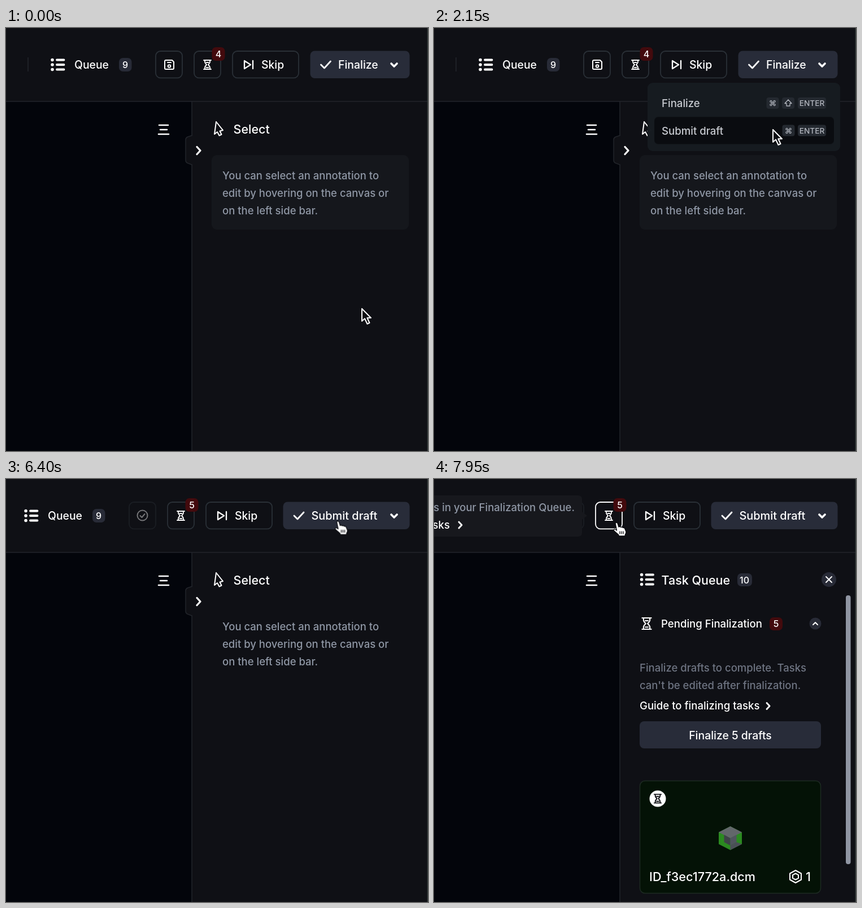
An HTML page that plays this animation: 747 by 749 pixels, repeating every 8 s.

```html
<!DOCTYPE html>
<html lang="en">
<head>
<meta charset="utf-8">
<title>Task toolbar</title>
<style>
html, body { margin: 0; width: 100%; height: 100%; overflow: hidden; background: #0f1015; }
svg { display: block; width: 747px; height: 749px; }
text { font: 500 19.4px Inter, "DejaVu Sans", sans-serif; fill: #fff; white-space: pre; }
.body { font-size: 18.5px; fill: #8f97a5; }
.faint { fill: #6e7482; }
.hint { font-size: 17.8px; }
.title { font-size: 21.5px; }
.item { font-size: 18.6px; fill: #c9ccd2; }
.label { font-size: 18.6px; }
.file { font-size: 21.6px; }
.num { font-size: 16px; text-anchor: middle; }
.key { font-size: 13.7px; fill: #b4b8c0; text-anchor: middle; }
.end { text-anchor: end; }
.mid { text-anchor: middle; }
.line { fill: none; stroke: #fff; stroke-width: 2; stroke-linejoin: round; stroke-linecap: round; }
.bold { stroke-width: 3.3; }
.box { fill: none; stroke: #2a3037; stroke-width: 1.8; }
.chip { fill: #282b37; }
.red { fill: #430a0d; }
.btn { fill: #282c39; }
.tip { fill: #17181d; }
.cap { fill: #252a31; }
</style>
</head>
<body>
<svg viewBox="0 0 747 749">
  <defs>
    <g id="list" class="line">
      <path d="M2 2h.1M2 10.5h.1M2 19h.1" style="stroke-width:5.4"/>
      <path d="M10 2H22.5M10 10.5H22.5M10 19H22.5" style="stroke-width:3.8"/>
    </g>
    <path id="glass" d="M-6.5-8H6.5M-6.5 8H6.5M-4.5-8V-5Q-4.5-3-1.3 0Q-4.5 3-4.5 5V8M4.5-8V-5Q4.5-3 1.3 0Q4.5 3 4.5 5V8M-2-4H2M-2 5H2"/>
    <path id="check" class="line" style="stroke-width:2.8" d="M0 7L6 13L17 1"/>
    <path id="right" class="line bold" d="M0 0L6 6.5L0 13"/>
    <path id="down" class="line" style="stroke-width:3.6" d="M682 63L687 68L692 63"/>
    <g id="enter">
      <rect class="cap" x="644" y="-10" width="50" height="20" rx="4"/>
      <text class="key" x="669" y="5">ENTER</text>
    </g>
    <g id="cmd">
      <rect class="cap" x="-11" y="-10" width="22" height="20" rx="4"/>
      <text class="key" y="5">⌘</text>
    </g>
  </defs>

  <rect width="747" height="749" fill="#0f1015"/>
  <rect y="130" width="329" height="619" fill="#03050b"/>
  <path d="M0 130H746M329 130V749" fill="none" stroke="#22252b" stroke-width="1.5"/>
  <path class="line" style="stroke-width:2.6" d="M271 172H287M273 180H285M270 188H288"/>

  <g id="select">
    <path d="M330 190L321 193Q318 194.5 318 198V234Q318 237.5 321 239L330 242.5" fill="#0f1015" stroke="#22252b" stroke-width="1.5"/>
    <use href="#right" x="338" y="210.5"/>
    <path class="line" d="M372 166L369 188L374 184L377.5 190.5L381.5 188.5L378.5 182.5L384 181Z"/>
    <text class="title" x="402.5" y="187">Select</text>
    <rect id="card" x="364" y="225" width="349" height="132" rx="9" fill="#15171c"/>
    <text class="body" x="383" y="267.6">You can select an annotation to</text>
    <text class="body" x="383" y="299">edit by hovering on the canvas or</text>
    <text class="body" x="383" y="330.4">on the left side bar.</text>
  </g>

  <g id="tasks">
    <rect x="330" y="131" width="415" height="618" fill="#0f1015"/>
    <use href="#list" x="365.5" y="167.5"/>
    <text class="title" x="402.5" y="186.5">Task Queue</text>
    <rect class="chip" x="537" y="167" width="26" height="23" rx="7"/>
    <text class="num" x="549.5" y="184.5">10</text>
    <circle class="chip" cx="699" cy="178" r="13"/>
    <path class="line" d="M694 173L704 183M704 173L694 183"/>
    <rect x="729" y="206" width="8.5" height="476" rx="4" fill="#9096a3"/>
    <use href="#glass" class="line" style="stroke-width:1.7" transform="translate(376.5 256) scale(1.25)"/>
    <text class="label" x="402" y="263">Pending Finalization</text>
    <rect class="red" x="594" y="245" width="23" height="23" rx="7"/>
    <text class="num" x="605.5" y="262">5</text>
    <circle class="chip" cx="675" cy="256" r="10.5"/>
    <path class="line" d="M671 258L675 254L679 258"/>
    <text class="body faint" x="364" y="340.5">Finalize drafts to complete. Tasks</text>
    <text class="body faint" x="364" y="372">can't be edited after finalization.</text>
    <text class="label" x="364" y="408">Guide to finalizing tasks</text>
    <use href="#right" transform="translate(589 396.5) scale(.85)"/>
    <rect class="btn" x="364" y="429" width="321" height="48" rx="8"/>
    <text class="mid" x="524.5" y="460.5">Finalize 5 drafts</text>
    <rect x="364.5" y="534.5" width="320" height="199" rx="9" fill="#041206" stroke="#1d2a22" stroke-width="1.5"/>
    <circle cx="396" cy="566" r="14.5" fill="#fff"/>
    <use href="#glass" class="line" style="stroke:#0f1015" transform="translate(396 566) scale(.95)"/>
    <g transform="translate(524.5 636)">
      <path d="M0-21L20.5-10.5V10.5L0 21L-20.5 10.5V-10.5Z" fill="#2b8a20"/>
      <path d="M0-21L20.5-10.5L0 0L-20.5-10.5Z" fill="#62676a"/>
      <path d="M-11-6L0 0V13L-11 7Z" fill="#3d4247"/>
      <path d="M0 0L11-6V7L0 13Z" fill="#50555e"/>
      <path d="M0 13L11 7L20.5 10.5L0 21Z" fill="#4a4f56"/>
    </g>
    <text class="file" x="381" y="712">ID_f3ec1772a.dcm</text>
    <path class="line" d="M640 693L650 698.5V709.5L640 715L630 709.5V698.5ZM640 698.5L645 701.2V706.8L640 709.5L635 706.8V701.2Z"/>
    <text class="file" x="658" y="712">1</text>
  </g>

  <g id="bar">
    <g id="queue">
      <path d="M39 52V77" stroke="#23262c" stroke-width="1.5"/>
      <use href="#list" x="80" y="54.5"/>
      <text x="121" y="72">Queue</text>
      <g id="nine">
        <rect class="chip" x="200" y="53" width="22.5" height="24" rx="7"/>
        <text class="num" x="211" y="71">9</text>
      </g>
      <g id="ten">
        <rect class="chip" x="199" y="53" width="27" height="24" rx="7"/>
        <text class="num" x="212.5" y="71">10</text>
      </g>
    </g>
    <g id="save">
      <rect class="box" x="265" y="41" width="47" height="47.3" rx="8.5"/>
      <path class="line" d="M281 59Q281 57 283 57H294L297 60V71Q297 73 295 73H283Q281 73 281 71ZM286 61H292"/>
      <circle class="line" cx="289" cy="67.5" r="2.3"/>
    </g>
    <g id="saved" opacity=".42">
      <rect class="box" x="265" y="41" width="47" height="47.3" rx="8.5"/>
      <circle class="line" cx="288.5" cy="64.5" r="9"/>
      <path class="line" d="M284.5 65L287.5 68L292.5 62"/>
    </g>
    <rect id="glassBox" class="box" x="333" y="41" width="47" height="47.3" rx="8.5"/>
    <use href="#glass" class="line" style="stroke-width:1.8" x="356.5" y="65"/>
    <rect class="red" x="364.5" y="34" width="23" height="24" rx="7"/>
    <text id="four" class="num" x="376" y="52">4</text>
    <text id="five" class="num" x="376" y="52">5</text>
    <g id="skip">
      <rect id="skipBox" class="box" x="401" y="41" width="117" height="47.3" rx="8.5"/>
      <path class="line" style="stroke-width:2.3" d="M422 58L433 65L422 72ZM437 58V72"/>
      <text x="452" y="72">Skip</text>
    </g>
  </g>

  <g id="finalize">
    <rect class="btn" x="538.5" y="40.5" width="176" height="48.5" rx="8"/>
    <use href="#check" x="557.5" y="58"/>
    <text x="588" y="72">Finalize</text>
    <use href="#down"/>
  </g>
  <g id="submit">
    <rect id="submitBox" class="btn" x="490.5" y="40.5" width="224" height="48.5" rx="8"/>
    <g id="submitText">
      <use href="#check" x="510" y="58"/>
      <text x="540.5" y="72" style="font-size:19.9px">Submit draft</text>
    </g>
    <use id="caret" href="#down"/>
    <path id="split" d="M491 49Q491 41 499 41H666V89H499Q491 89 491 81Z" fill="#000"/>
  </g>

  <g id="menu">
    <rect x="378" y="97" width="341" height="121" rx="9" fill="#171c21"/>
    <rect id="pick" x="390" y="109" width="318" height="48" rx="7" fill="#0b0d11"/>
    <text class="item" x="403" y="140">Finalize</text>
    <text class="item" x="403" y="188.5">Submit draft</text>
    <use href="#cmd" x="599.5" y="133"/>
    <rect class="cap" x="616" y="123" width="22" height="20" rx="4"/>
    <path class="line" style="stroke:#b4b8c0;stroke-width:1.3" d="M627 127L633 133.5H630V138H624V133.5H621Z"/>
    <use href="#enter" y="133"/>
    <use href="#cmd" x="627.5" y="181.5"/>
    <use href="#enter" y="181.5"/>
  </g>

  <text id="skipTip" class="body hint mid" x="412" y="134.5">You can skip this task and access it later</text>
  <g id="glassTip">
    <path class="tip" d="M-9 29H255Q262 29 262 36V58L271 65L262 72V95Q262 102 255 102H-9Z"/>
    <text class="body end" x="249" y="56.5">You have 5 tasks in your Finalization Queue.</text>
    <text class="label end" x="28" y="87.5">Guide to finalizing tasks</text>
    <use href="#right" transform="translate(44 76) scale(.85)"/>
  </g>

  <rect id="dim" width="747" height="749" fill="#000"/>
  <path d="M746.3 0V749" stroke="#3c4441" stroke-width="1.2"/>

  <g id="cursor">
    <path id="arrow" d="M0 0V22L5 17.5L9.5 27L13.5 25L9.3 16.3H16Z" fill="#0b0c10" stroke="#fff" stroke-width="2" stroke-linejoin="round"/>
    <g id="hand" stroke="#08090d" stroke-width="1.3" stroke-linejoin="round">
      <path d="M3 2.5Q5-.5 7 2.5L9 9Q11 7.5 12.500 9.300Q15 8.300 16.500 10.300Q19 9.500 20 12.500L22 17.500Q22 20.500 20.500 22L20 25H9.500L8.500 22.500Q4 19 .5 15.500Q-.5 12.500 2.500 13L5.500 15Z" fill="#fff"/>
      <path d="M11 16.5V21.5M14 16.5V21.5M17 16.5V21.5" fill="none"/>
    </g>
  </g>
</svg>
<script>
const LOOP = 8000;
const at = (x, y) => `translate(${x}px, ${y}px)`;

// Plays a table of [time, value] rows; hard rows hold until the next one.
function track(id, prop, rows, hard = false) {
  const full = [[0, rows[0][1]], ...rows, [LOOP, rows[rows.length - 1][1]]];
  const frames = full.map(([t, value]) => ({
    offset: t / LOOP, [prop]: value, easing: hard ? 'step-end' : 'linear'
  }));
  document.getElementById(id).animate(frames, { duration: LOOP, iterations: Infinity });
}
const fade = (id, ...rows) => track(id, 'opacity', rows);
const swap = (id, ...rows) => track(id, 'opacity', rows, true);

// Eased move along a quadratic curve, as rows.
function arc(t0, t1, [ax, ay], [cx, cy], [bx, by], steps = 12) {
  return Array.from({ length: steps + 1 }, (_, i) => {
    const k = i / steps, u = k * k * (3 - 2 * k), v = 1 - u;
    const mix = (a, c, b) => a * v * v + 2 * c * u * v + b * u * u;
    return [t0 + (t1 - t0) * k, at(mix(ax, cx, bx), mix(ay, cy, by))];
  });
}

track('cursor', 'transform', [
  ...arc(350, 1000, [630, 497], [580, 300], [689, 57.5]),
  ...arc(1450, 2000, [689, 57.5], [660, 150], [600, 180]),
  ...arc(2200, 2650, [600, 180], [612, 120], [599, 71]),
  [3000, at(599, 71)],
  [4700, at(593, 70.5)],
  [5500, at(589, 71)],
  [6349, at(589, 71)],
  [6350, at(582.5, 73.5)],
  ...arc(6780, 7050, [582.5, 73.5], [460, 92], [349, 88]),
  ...arc(7110, 7450, [349, 88], [330, 86], [318, 76])
]);
swap('arrow', [0, 1], [6350, 0]);
swap('hand', [0, 0], [6350, 1]);

fade('menu', [1200, 0], [1420, 1], [2150, 1], [2300, 0]);
track('pick', 'transform', [[0, at(0, 0)], [1750, at(0, 48.5)]], true);

track('bar', 'transform', [[0, at(0, 0)], [2200, at(-47, 0)]], true);
track('queue', 'transform', [[0, at(0, 0)], [6450, at(-3.5, 0)]], true);
swap('nine', [0, 1], [6450, 0]);
swap('ten', [0, 0], [6450, 1]);
swap('finalize', [0, 1], [2200, 0]);
swap('submit', [0, 0], [2200, 1]);
track('submitBox', 'fill', [[0, '#282c39'], [3000, '#1b1e25'], [6350, '#282c39']], true);

fade('dim', [3000, 0], [3250, .46], [5500, .46], [5600, .3], [6345, .3], [6395, 0]);
fade('skip', [3000, 1], [3250, .42], [6345, .42], [6395, 1]);
fade('submitText', [3000, 1], [3250, .42], [6345, .42], [6395, 1]);
fade('caret', [3000, 1], [3250, .6], [6345, .6], [6395, 1]);
fade('split', [3000, 0], [3250, .25], [6345, .25], [6395, 0]);
swap('save', [0, 1], [3100, 0]);
swap('saved', [0, 0], [3100, .42]);
swap('four', [0, 1], [5550, 0]);
swap('five', [0, 0], [5550, 1]);
swap('card', [0, 1], [6350, 0]);

track('skipBox', 'stroke', [[0, '#2a3037'], [6900, '#fff'], [7150, '#2a3037']], true);
track('glassBox', 'stroke', [[0, '#2a3037'], [7250, '#fff']], true);
fade('skipTip', [6990, 0], [7050, .3], [7150, .8], [7200, .8], [7350, 0]);
fade('glassTip', [7350, 0], [7550, 1]);
fade('tasks', [7650, 0], [7800, 1]);
fade('select', [7650, 1], [7800, 0]);
</script>
</body>
</html>
```
